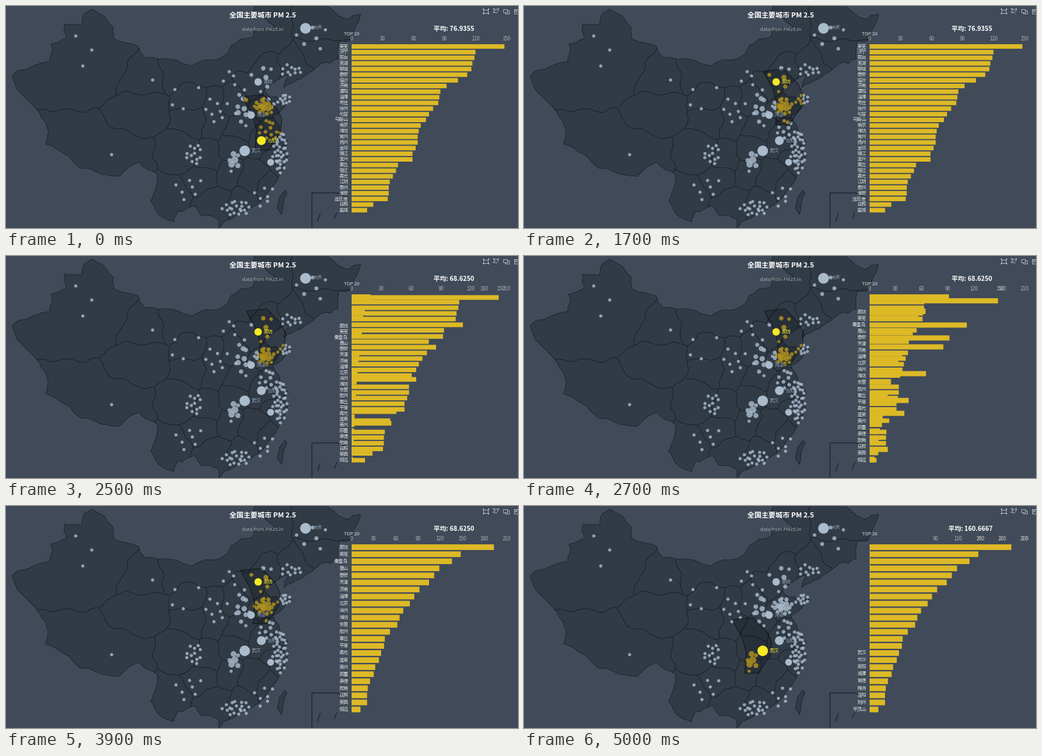
Animation of 800x348 px, one loop 5100 ms. Source, as a matplotlib script:

```python
import numpy as np
import matplotlib.pyplot as plt
from matplotlib.animation import FuncAnimation
from matplotlib.patches import Circle, FancyBboxPatch, Polygon, Rectangle
from matplotlib.path import Path

W, H, DPI = 800, 348, 100
STEP, LOOP = 100, 5100
PX = 72 / DPI
BG, LAND, BORDER = "#404a59", "#313b46", "#11151b"
GREY, GOLD, YELLOW = "#aabbcc", "#ddb926", "#f4e925"

plt.rcParams["font.family"] = ["Noto Sans CJK JP"]
rng = np.random.default_rng(4)
fig = plt.figure(figsize=(W / DPI, H / DPI), dpi=DPI, facecolor=BG)
ax = fig.add_axes([0, 0, 1, 1])
ax.set_xlim(0, W)
ax.set_ylim(H, 0)
ax.axis("off")


def pairs(*values):
    return np.array(values, float).reshape(-1, 2)


def rough(points, amount, passes=2):
    """Subdivide a polyline with small seeded sideways shifts."""
    for _ in range(passes):
        a, b = points[:-1], points[1:]
        side = (b - a)[:, ::-1] * [-1, 1]
        merged = np.empty((2 * len(points) - 1, 2))
        merged[::2] = points
        merged[1::2] = (a + b) / 2 + side * rng.normal(0, amount, (len(a), 1))
        points = merged
    return points


def label(x, y, text, size=7.3, color="#ddd", ha="center", bold=False, z=10):
    return ax.text(x, y, text, fontsize=size * PX, color=color, ha=ha, va="center",
                   weight="bold" if bold else "normal", zorder=z)


# ---- map: a few corners of the outline, provinces as nearest-centre regions ----
COUNTRY = pairs(
    10, 109, 20, 101, 68, 87, 70, 60, 94, 51, 92, 28, 118, 30, 122, 13, 134, 5, 168, 34,
    168, 51, 207, 63, 216, 81, 261, 84, 291, 94, 335, 82, 352, 62, 385, 49, 388, 38,
    421, 33, 404, 19, 384, 16, 394, -9, 490, -9, 511, 7, 533, 21, 554, 13, 538, 53,
    520, 56, 519, 83, 493, 90, 461, 114, 434, 128, 442, 108, 413, 124, 403, 132, 413, 143,
    446, 146, 417, 172, 432, 202, 441, 214, 434, 226, 441, 234, 428, 263, 405, 299,
    367, 325, 340, 338, 333, 349, 333, 335, 306, 329, 294, 313, 268, 322, 262, 338,
    240, 328, 226, 306, 235, 283, 236, 263, 208, 245, 177, 267, 150, 264, 107, 246,
    62, 216, 66, 197, 52, 167, 17, 130, 10, 109)
TAIWAN = pairs(436, 289, 439, 294, 430, 327, 424, 317, 427, 301, 436, 289)
PROVINCES = [pairs(*p) for p in (
    (110, 105, 165, 85), (110, 221, 190, 235), (215, 165), (215, 110, 297, 176),
    (295, 145), (270, 100, 320, 105, 380, 75, 405, 40), (322, 180, 325, 150), (354, 148),
    (388, 125, 402, 100), (366, 192), (405, 155), (422, 195), (397, 210), (356, 223),
    (349, 258), (388, 265), (426, 244), (409, 282), (372, 315), (325, 307), (308, 270),
    (258, 302), (275, 230), (315, 238), (452, 100), (490, 72), (490, 35))]

land, _ = [ax.add_patch(Polygon(rough(shape, amount), fc=LAND, ec=BORDER, lw=0.6 * PX,
                                zorder=1))
           for shape, amount in ((COUNTRY, 0.06), (TAIWAN, 0.04))]

gx, gy = np.meshgrid(np.arange(0, 560, 2.0), np.arange(0, 350, 2.0))
wx = gx + 2.5 * np.sin(gy / 6) + 1.5 * np.sin(gx / 4 + gy / 9)
wy = gy + 2.5 * np.sin(gx / 7) + 1.5 * np.cos(gx / 9 - gy / 4)
distance = np.array([np.min([np.hypot(wx - x, wy - y) for x, y in p], axis=0)
                     for p in PROVINCES])
for i, own in enumerate(distance):
    nearest_other = np.delete(distance, i, axis=0).min(axis=0)
    lines = ax.contour(gx, gy, nearest_other - own, [0], colors=BORDER,
                       linewidths=0.4 * PX, zorder=2)
    lines.set_clip_path(land)

# South sea inset
for line in (pairs(478, 350, 478, 293, 518, 293, 534, 300),
             pairs(487, 337, 491, 325), pairs(513, 333, 517, 324)):
    ax.plot(*line.T, color=BORDER, lw=0.9 * PX, zorder=2)

# ---- cities: lone ones, then clusters (x, y, radius x, radius y, count, largest) ----
LONE = pairs(109, 47, 134, 69, 120, 94, 165, 233, 229, 116, 264, 131, 260, 155,
             277, 161, 301, 128)
CLUSTERS = [
    (428, 228, 11, 34, 34, 5), (409, 192, 14, 18, 10, 6), (404, 157, 16, 13, 18, 9),
    (435, 146, 10, 9, 10, 5), (400, 112, 20, 24, 7, 8), (370, 160, 13, 30, 12, 8.5),
    (446, 101, 16, 10, 10, 5), (478, 50, 28, 25, 6, 6.5), (356, 242, 10, 18, 7, 11),
    (330, 165, 22, 20, 8, 5), (293, 232, 14, 17, 12, 5), (360, 317, 22, 13, 19, 5),
    (402, 296, 17, 18, 7, 5), (285, 285, 26, 20, 7, 5), (347, 113, 20, 14, 4, 5)]
TOP = [("大庆", 468, 35, 279), ("武汉", 373, 227, 273), ("合肥", 399, 211, 229),
       ("菏泽", 383, 171, 194), ("廊坊", 394, 119, 193), ("衢州", 413.5, 245, 177)]


def scatter_cluster(x, y, rx, ry, count, largest):
    """Spread cities evenly over an ellipse, with a little jitter."""
    k = np.arange(count)
    r, turn = np.sqrt((k + 0.5) / count), k * 2.4
    spots = np.c_[x + rx * r * np.cos(turn), y + ry * r * np.sin(turn)]
    return spots + rng.normal(0, 1.2, spots.shape), np.linspace(largest, 5, count)


groups = [scatter_cluster(*c) for c in CLUSTERS]
city_xy = np.vstack([LONE] + [xy for xy, _ in groups])
city_d = np.concatenate([np.full(len(LONE), 5.0)] + [d for _, d in groups])
cities = ax.scatter(*city_xy.T, s=(city_d * PX) ** 2, lw=0, alpha=0.82, zorder=3)

top_xy = np.array([c[1:3] for c in TOP], float)
top_d = np.array([c[3] for c in TOP]) * 0.06
tops = ax.scatter(*top_xy.T, s=(top_d * PX) ** 2, lw=0, zorder=6)
top_labels = [label(x + d / 2 + 3, y - 0.5, name, ha="left", z=6)
              for (name, x, y, _), d in zip(TOP, top_d)]

# ---- brush in its last pose, and its drag as (ms, dx, dy) ----
BRUSH = pairs(326, 178, 358, 175, 380, 198, 387, 213, 385, 234, 366, 262, 345, 262,
              347, 228, 340, 205, 330, 187)
DRAG = [(1200, 44, -36), (1900, 50, -92), (3800, 50, -92), (4200, 14, -33), (4500, 0, 0)]
brush = ax.add_patch(Polygon(BRUSH, fc=(0, 0, 0, 0.2), ec=(0, 0, 0, 0.5),
                             lw=1.2 * PX, joinstyle="round", zorder=5))


def brush_shift(ms):
    times, dx, dy = zip(*DRAG)
    return np.array([np.interp(ms, times, dx), np.interp(ms, times, dy)])


# ---- headings and toolbar ----
label(401.5, 14, "全国主要城市 PM 2.5", 11, "white", bold=True)
label(401.5, 37, "data from PM25.in", 7.5, "#aaa")
label(540, 43.5, "TOP 20")
average = label(732, 36, "", 9.9, "white", ha="right", bold=True)


def icon(*values):
    ax.plot(*pairs(*values).T, color="#b4bac2", lw=0.9 * PX, zorder=10)


def frame_icon(x, y, w, h):
    ax.add_patch(Rectangle((x, y), w, h, fc="none", ec="#b4bac2", lw=0.9 * PX, zorder=10))


frame_icon(746, 5.5, 7, 5.5)
for cx in (745.5, 753.5):
    for cy in (5, 11.5):
        ax.add_patch(Rectangle((cx - 1, cy - 1), 2, 2, fc="#b4bac2", zorder=10))
icon(767, 11, 761, 10, 764, 7.5, 761, 4, 766, 5.5, 770, 4, 768, 9)
frame_icon(777, 4.5, 6, 5)
icon(783, 7, 786, 7, 786, 12, 780, 12, 780, 9.5)
frame_icon(793.5, 4.5, 9, 7)
icon(795.5, 6.5, 799, 9.8)
icon(799, 6.5, 795.5, 9.8)

# ---- bar chart ----
LEFT, RIGHT, TOP_Y, BOTTOM_Y = 540, 782, 59, 324.5


class Chart:
    def __init__(self, start, names, values, low, high, mean):
        self.start, self.names, self.mean = start, names.split(), mean
        scale = (RIGHT - LEFT) / (high - low)
        self.ticks = {v: LEFT + (v - low) * scale for v in range(low, high + 1, 30)}
        band = (BOTTOM_Y - TOP_Y) / len(self.names)
        self.ys = [TOP_Y + band * (i + 0.5) for i in range(len(self.names))]
        self.bars = {name: np.array([y, (v - low) * scale, band * 0.8])
                     for name, y, v in zip(self.names, self.ys, values)}


CHARTS = [
    Chart(-9999,
          "莱芜 济宁 邢台 芜湖 聊城 泰安 临沂 济南 溧阳 淄博 枣庄 徐州 句容 马鞍山 南京 "
          "潍坊 常州 扬州 金坛 镇江 宜兴 章丘 宿迁 寿光 江阴 泰州 淮安 连云港 日照 盐城",
          [148, 120, 119, 117, 116, 112, 103, 92, 86, 85, 84, 79, 75, 72, 67,
           65, 64, 64, 62, 59, 59, 45, 43, 40, 37, 36, 36, 35, 21, 15],
          0, 150, 76.9355),
    Chart(2180,
          "廊坊 莱芜 秦皇岛 唐山 泰安 天津 济南 淄博 北京 滨州 潍坊 东营 "
          "胶州 章丘 平度 寿光 蓬莱 莱州 即墨 承德 胶南 日照 莱西 招远",
          [193, 148, 136, 119, 112, 105, 92, 85, 79, 70, 65, 62,
           52, 45, 44, 40, 37, 32, 30, 25, 22, 21, 21, 12],
          0, 210, 68.625),
    Chart(4900, "武汉 长沙 岳阳 湘潭 常德 株洲 洛阳 荆州 平顶山",
          np.linspace(273, 113, 9), 90, 300, 160.6667),
]


def cubic_in_out(t):
    t = min(max(t, 0), 1)
    return 4 * t ** 3 if t < 0.5 else 1 - 4 * (1 - t) ** 3


def draw_chart(ms):
    k = max(i for i, c in enumerate(CHARTS) if c.start <= ms)
    new, old = CHARTS[k], CHARTS[max(k - 1, 0)]
    p = cubic_in_out((ms - new.start) / 1000)
    shrink, grow = np.array([1, 1 - p, 1]), np.array([1, p, 1])

    boxes = []
    if p < 1:
        boxes += [b * shrink for n, b in old.bars.items() if n not in new.bars]
    for name, bar in new.bars.items():
        before = old.bars.get(name)
        boxes.append(bar * grow if before is None else before + (bar - before) * p)
    drawn = [ax.add_patch(Rectangle((LEFT, y - h / 2), w, h, fc=GOLD, lw=0, zorder=8,
                                    snap=False))
             for y, w, h in boxes if w > 0]

    # Axis labels keep their index counted from the bottom.
    old_ys = old.ys[len(old.ys) - len(new.ys):]
    for name, y0, y1 in zip(new.names, old_ys, new.ys):
        drawn.append(label(535, y0 + (y1 - y0) * p, name, ha="right"))
    for value, x in new.ticks.items():
        x0 = old.ticks.get(value, x)
        drawn.append(label(x0 + (x - x0) * p, 52, str(value), 8, "#aaa"))
    average.set_text(f"平均: {new.mean:.4f}")
    return drawn


def draw_tooltip(ms):
    if not 4100 <= ms <= 4300:
        return []
    x = np.interp(ms, [4100, 4200], [437, 399])
    y = np.interp(ms, [4100, 4200], [166, 184])
    box = FancyBboxPatch((x + 2.4, y + 2.4), 141.2, 26.2, boxstyle="round,pad=2.4",
                         fc=(0.196, 0.196, 0.196, 0.7), lw=0, zorder=20)
    return [ax.add_patch(box),
            label(x + 6, y + 9.5, "Top 5", 8.8, "white", "left", z=21),
            ax.add_patch(Circle((x + 9, y + 22), 2.9, fc=YELLOW, lw=0, zorder=21)),
            label(x + 14.5, y + 22, "菏泽 : 115.480656, 35.23375, 194", 8.4, "white",
                  "left", z=21)]


dynamic = []


def update(frame):
    ms = frame * STEP
    while dynamic:
        dynamic.pop().remove()
    shape = BRUSH + brush_shift(ms)
    brush.set_xy(shape)
    area = Path(np.vstack([shape, shape[:1]]))
    cities.set_facecolor([GOLD if hit else GREY for hit in area.contains_points(city_xy)])
    cities.set_alpha(0.82)
    chosen = area.contains_points(top_xy)
    tops.set_facecolor([YELLOW if hit else GREY for hit in chosen])
    for text, hit in zip(top_labels, chosen):
        text.set_color(YELLOW if hit else GREY)
        text.set_alpha(1 if hit else 0.8)
    dynamic.extend(draw_chart(ms) + draw_tooltip(ms))
    return []


anim = FuncAnimation(fig, update, frames=LOOP // STEP, init_func=lambda: [],
                     interval=STEP, repeat=True, repeat_delay=0, blit=False)
plt.show()
```
